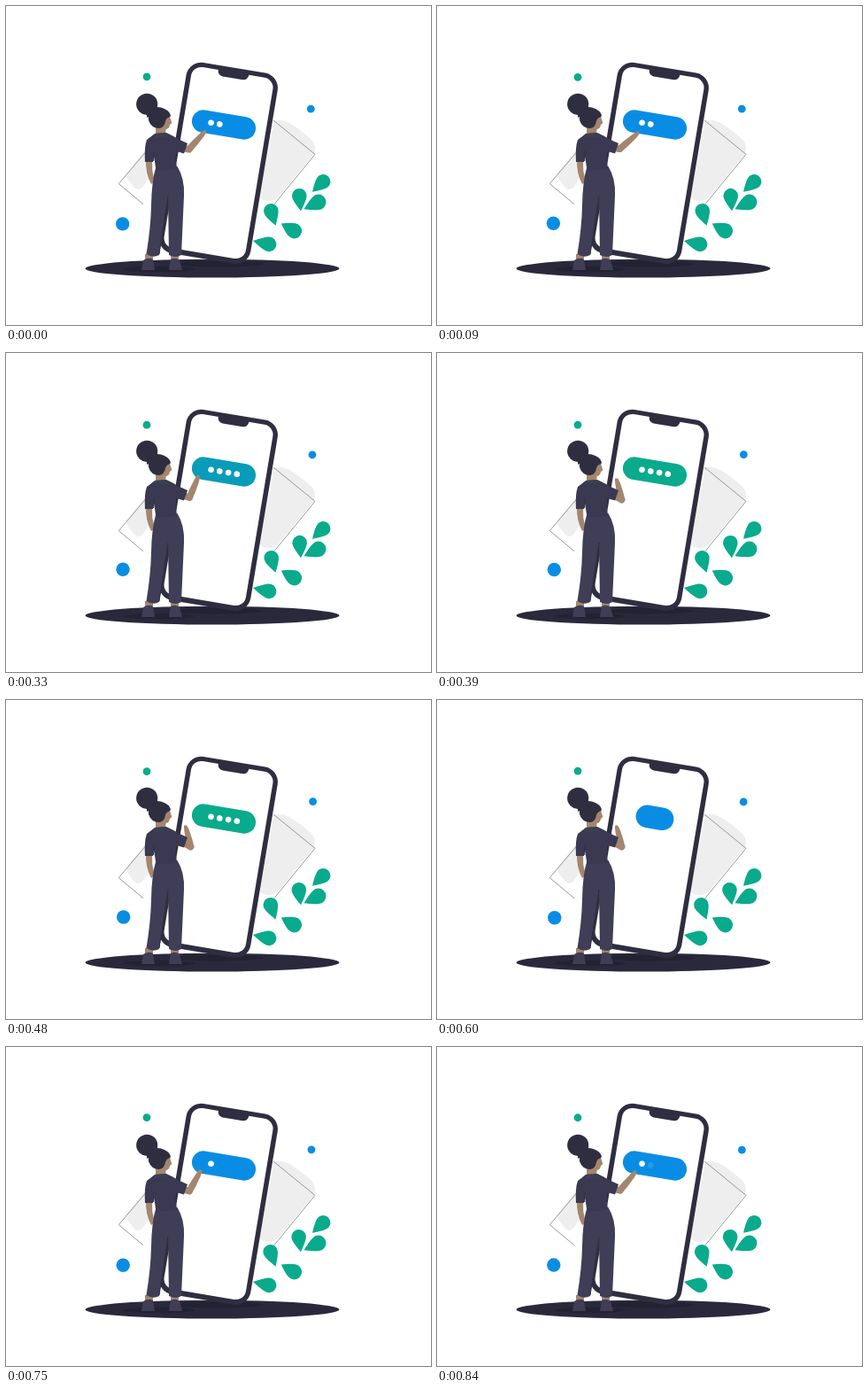
Write an HTML page with a canvas that moves like this. It is 480 by 360 pixels and loops after 870 ms.

```html
<!DOCTYPE html>
<html lang="en">
<head>
<meta charset="utf-8">
<style>
html, body { margin: 0; width: 100%; height: 100%; overflow: hidden; background: #fff; }
canvas { display: block; width: 480px; height: 360px; }
</style>
</head>
<body>
<canvas id="stage" width="480" height="360"></canvas>
<script>
const ctx = document.getElementById('stage').getContext('2d');
const LOOP = 870, STEP = 30, TILT = 9.5 * Math.PI / 180;
const DARK = '#2f2e41', NAVY = '#3f3e56', TOP = '#3a3951', SKIN = '#a3866d', GREY = '#eeeeee';
const BLUE = [9, 141, 228], GREEN = [9, 171, 140];
const BLUE_CSS = `rgb(${BLUE})`, GREEN_CSS = `rgb(${GREEN})`;

const mix = (a, b, k) => a + (b - a) * k;
const ease = (t, from, to) => {
  const k = Math.min(1, Math.max(0, (t - from) / (to - from)));
  return k * k * (3 - 2 * k);
};
const wave = (t, peak) => Math.cos((t - peak) / LOOP * 2 * Math.PI);

function shape(d, color) {
  ctx.fillStyle = color;
  ctx.fill(new Path2D(d));
}

function line(d, color, width) {
  ctx.strokeStyle = color;
  ctx.lineWidth = width;
  ctx.stroke(new Path2D(d));
}

function ellipse(x, y, rx, ry, color) {
  ctx.fillStyle = color;
  ctx.beginPath();
  ctx.ellipse(x, y, rx, ry, 0, 0, 2 * Math.PI);
  ctx.fill();
}

const circle = (x, y, r, color) => ellipse(x, y, r, r, color);

function roundBox(x, y, w, h, r, color) {
  ctx.fillStyle = color;
  ctx.beginPath();
  ctx.roundRect(x, y, w, h, r);
  ctx.fill();
}

function tilted(x, y, paint) {
  ctx.save();
  ctx.translate(x, y);
  ctx.rotate(TILT);
  paint();
  ctx.restore();
}

function leaf(x, y, r, tipX, tipY) {
  const length = Math.hypot(tipX - x, tipY - y);
  ctx.save();
  ctx.translate(x, y);
  ctx.rotate(Math.atan2(tipY - y, tipX - x));
  ctx.fillStyle = GREEN_CSS;
  ctx.beginPath();
  ctx.arc(0, 0, r, 1.2, -1.2);
  ctx.quadraticCurveTo(r * 0.95, -r * 0.74, length, 0);
  ctx.quadraticCurveTo(r * 0.95, r * 0.74, r * Math.cos(1.2), r * Math.sin(1.2));
  ctx.fill();
  ctx.restore();
}

function backdrop(t) {
  shape('M160 163 L156 164 L137 188 Q135 192 138 196 L145 205 Q149 209 154 205 L164 190Z', GREY);
  shape('M303 129 L311 129 Q322 130 345 151 Q351 157 348 167 L308 215 Q298 225 286 216Z', GREY);
  line('M158 164.5 L127.3 200.6 L155 223.7', '#89908f', 0.9);
  line('M302 129 L349 167.4 L303 223.5', '#89908f', 0.9);

  circle(159, 80.4 + 0.8 * wave(t, 320), 4.4, GREEN_CSS);
  circle(345.4 + 1.2 * wave(t, 480), 115.4 - 0.8 * wave(t, 460), 4.4, BLUE_CSS);
  circle(132.1 + 0.7 * wave(t, 560), 245.3 - wave(t, 310), 7.7, BLUE_CSS);

  const sway = wave(t, 200);
  leaf(358.2, 198.2, 8.2, 346, 209.7);
  leaf(331.2 + 0.8 * sway, 214.2, 8.3, 333, 231.2);
  leaf(352.8, 221.3, 8.7, 336.5, 229.2);
  leaf(299.2 + 0.8 * sway, 231.2, 8.3, 304.5, 247.7);
  leaf(325.5, 253.8, 8.6, 310.8, 245.5);
  leaf(297, 268.8, 8.4, 279, 265);
}

function ground() {
  ellipse(233, 296.2, 143.5, 10.4, '#2a293c');
  ellipse(240, 291, 51, 3.5, '#232233');
  ellipse(173, 297, 40, 3.2, '#232233');
}

function phone() {
  tilted(240, 177, () => {
    roundBox(-52.3, -108.7, 104.6, 218.2, 17, DARK);
    roundBox(-46.8, -103.5, 93.6, 207, 11.5, '#fff');
    roundBox(-17.5, -105, 35, 8, [0, 0, 6, 6], DARK);
  });
}

function button(t) {
  const growing = t >= 555;
  const span = growing ? ease(t, 558, 660) : t >= 510 ? 1 - ease(t, 510, 555) : 1;
  const radius = 12.8 * (growing ? ease(t, 545, 590) : t >= 510 ? 1 - ease(t, 525, 555) : 1);
  const green = growing ? 0 : ease(t, 310, 350);
  const color = BLUE.map((c, i) => Math.round(mix(c, GREEN[i], green)));
  const half = 23.6 * span + radius;
  tilted(246, mix(132.2, 134, span), () => {
    if (radius > 0.2) roundBox(-half, -radius, 2 * half, 2 * radius, radius, `rgb(${color})`);
    // Dots appear one by one, the first two before the loop wraps.
    [700, 832, 982, 1120].forEach((start, i) => {
      const clock = growing ? t : t + LOOP;
      const alpha = ease(clock, start, start + 36) * (growing ? 1 : 1 - ease(t, 505, 530));
      if (alpha > 0) circle(-14.6 + 9.9 * i, 0.2, 3.3, `rgba(255,255,255,${alpha})`);
    });
  });
}

function armAngle(t) {
  const keys = [[0, 42], [90, 49], [150, 52], [285, 54], [380, -14], [620, -14], [750, 29], [840, 40], [LOOP, 42]];
  const i = keys.findIndex(([time]) => time > t);
  const [t0, a0] = keys[i - 1], [t1, a1] = keys[i];
  return mix(a0, a1, ease(t, t0, t1));
}

function rightArm(t) {
  const degrees = armAngle(t), angle = degrees * Math.PI / 180;
  const bend = (degrees + 14) / 68;
  const x = mix(208.6, 206, bend), y = mix(165.8, 161, bend);
  const length = mix(24.8, 29, bend);
  ctx.lineCap = 'round';
  line(`M198 160 L${x} ${y}`, SKIN, 7.4);
  ctx.save();
  ctx.translate(x, y);
  ctx.rotate(angle);
  shape(`M-3.8 1 Q-3.8 -10 -2.6 ${5 - length} L-1.8 ${-length} Q0 ${-length - 1.5} 1.9 ${-length + 1}
    L2.9 ${6 - length} Q4 -10 3.8 1 Q0 6 -3.8 1Z`, SKIN);
  ctx.restore();
  ctx.lineCap = 'butt';
}

function woman(t) {
  // Ankles and shoes
  shape('M157 280 H166 V289 H157Z M186 280 H195 V289 H186Z', SKIN);
  shape('M155 287 Q161 283 166 286 L168 298 H153Z', NAVY);
  shape('M186 286 Q191 283 196 287 L199 298 H184Z', NAVY);

  // Left arm and neck
  shape('M158 174 L165 174 L165.3 186 L168 198 L164 201 Q157.5 189 158 174Z', SKIN);
  shape('M169 133 L181 135 L180 146 L169 147Z', SKIN);
  rightArm(t);

  // Trousers
  shape('M169.5 181 H193.5 Q202 195 201 214 L198 281 Q192 285 184 281 L183 214 L173 281 Q166 285 158.5 280 Q163.5 250 164 225 Q164.5 197 169.5 181Z', NAVY);
  line('M183 214 L173 280', DARK, 1);

  // Top with sleeves
  shape('M168 144 L181 143 Q190 147 194 150 L205 155 L201 166.5 L192.5 164 Q190.5 173 193.5 184 L169.5 186 Q168.5 178 167 170 L166 176 L157 176 Q156 159 159 151 Q163 148 168 144Z', TOP);
  line('M166.5 175 L167 163', DARK, 0.9);
  shape('M168 144 L181 143 L183 148 L168 149Z', '#3a4052');

  // Head
  shape('M176 119 Q185.5 120 186 128 L187.4 132 L185 134 Q184.5 140 178 139 L172 134Z', SKIN);
  shape('M162 116 Q171 112 179 116 Q187 120 185.5 125 Q181 126 180 130 Q179 137 173 138 Q164 138 161 129 Q160 122 162 116Z', DARK);
  circle(159.2, 110.8, 12.1, DARK);
  shape('M159 119 L166 117 L163 124 L159 126 Z', DARK);
}

function draw(now) {
  const t = Math.floor(now % LOOP / STEP) * STEP;
  ctx.fillStyle = '#fff';
  ctx.fillRect(0, 0, 480, 360);
  backdrop(t);
  ground();
  phone();
  button(t);
  woman(t);
}

let start;
function tick(now) {
  start ??= now;
  draw(Math.max(0, now - start));
  requestAnimationFrame(tick);
}
draw(0);
requestAnimationFrame(tick);
</script>
</body>
</html>
```
